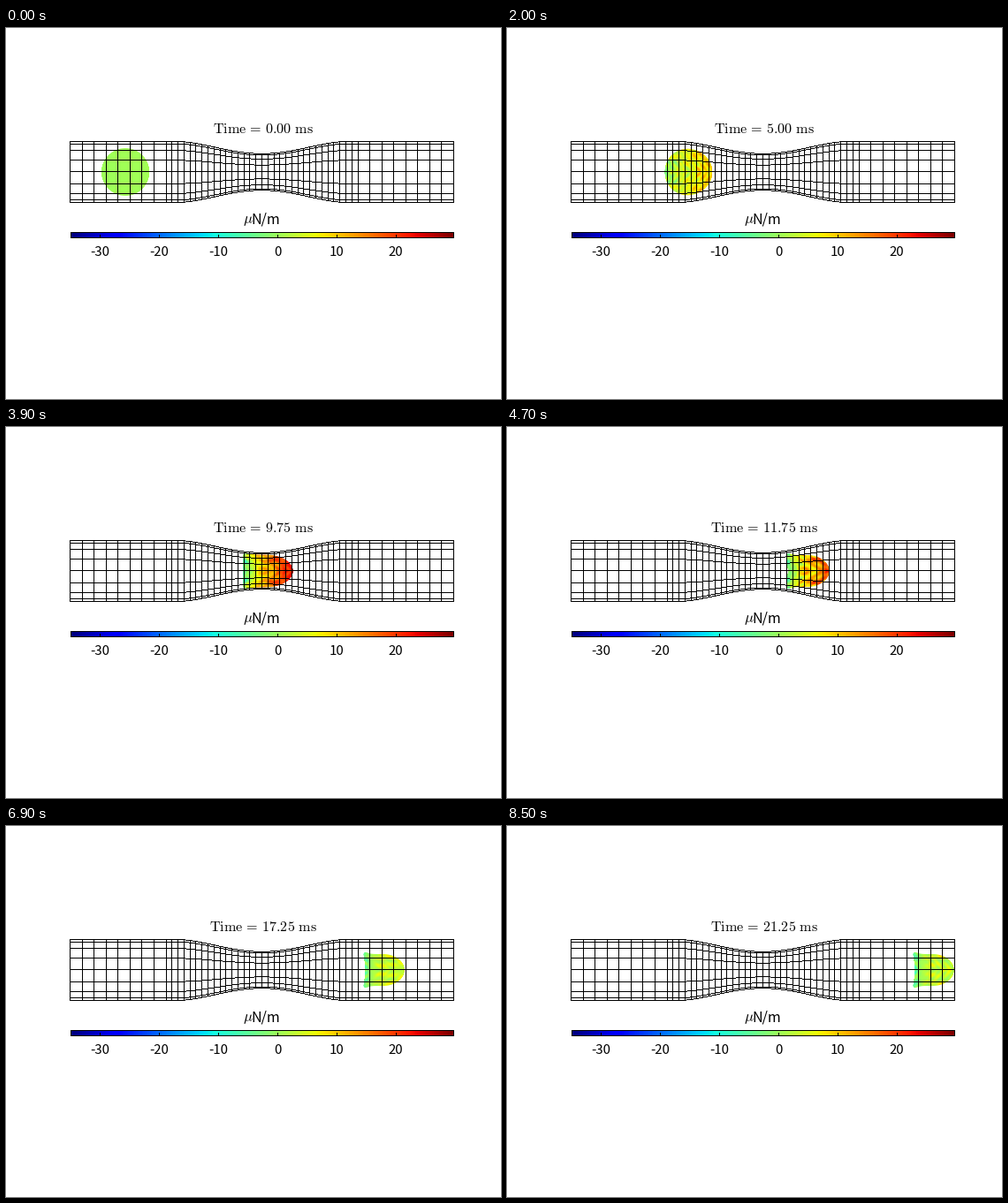
Animation of 560x420 px, one loop 8.6 s. Source, as a matplotlib script:

```python
import numpy as np
import matplotlib.pyplot as plt
from matplotlib.animation import FuncAnimation

W, H, DPI = 560, 420, 100
FRAMES, STEP = 86, 100
LEFT, RIGHT, XC, YC = 72, 506, 289, 162.5
HALF, THROAT, REACH = 34.5, 20.7, 95
VMIN, VMAX = -35, 29.7
SANS = "Noto Sans CJK JP"

plt.rcParams["mathtext.fontset"] = "cm"
jet = plt.get_cmap("jet")

fig = plt.figure(figsize=(W / DPI, H / DPI), dpi=DPI, facecolor="white")
ax = fig.add_axes([0, 0, 1, 1])
ax.axis("off")


def wall(x):
    """Half height of the channel at column x."""
    s = np.clip(np.abs(x - XC) / REACH, 0, 1)
    return HALF - (HALF - THROAT) * np.clip(np.cos(s * np.pi / 2), 0, 1) ** 1.7


def step(n, mid, width):
    return 1 / (1 + np.exp(-(n - mid) / width))


def bump(n, mid, width):
    return np.exp(-((n - mid) / width) ** 2)


def show(rgba, z):
    return ax.imshow(rgba, extent=(0, W, H, 0), aspect="auto",
                     interpolation="nearest", zorder=z)


def label(x, y, s, size, ha="center", **kw):
    return ax.text(x, y, s, fontsize=size * 72 / DPI, ha=ha, va="baseline", **kw)


def backdrop():
    """Channel mesh and colour bar, one pixel per line."""
    img = np.zeros((H, W, 4))
    black = (0, 0, 0, 1)
    cols = np.arange(LEFT, RIGHT + 1)
    for k in range(-4, 5):
        rows = np.rint(YC + np.sin(k * np.pi / 8) * wall(cols)).astype(int)
        img[rows, cols] = black
    # columns are twice as dense around the throat
    for k in range(65):
        if k % 2 == 0 or 16 <= k <= 48:
            x = int(LEFT + 0.5 + k * (RIGHT - LEFT) / 64)
            top, bottom = np.rint([YC - wall(x), YC + wall(x)]).astype(int)
            img[top:bottom + 1, x] = black

    img[231:238, 73:507] = black
    img[232:237, 74:506] = jet(np.linspace(0, 1, 432))
    for v in range(-30, 30, 10):
        img[234:237, int(307.5 + 6.69 * v)] = black
    return img


show(backdrop(), 3)
for v in range(-30, 30, 10):
    label(307.2 + 6.69 * v, 258, str(v).replace("-", "\u002d"), 15, family=SANS)
label(267.5, 221, r"$\mu$", 16.5, "left")
label(277.8, 221, "N/m", 16, "left", family=SANS)
title = label(290.5, 119, "", 16.1)

rng = np.random.default_rng(4)
WAVES = [(rng.uniform(-0.9, 0.9), rng.uniform(0.2, 0.9),
          rng.uniform(0, 2 * np.pi), rng.uniform(-0.12, 0.12))
         for _ in range(14)]

GX, GY = np.meshgrid(np.arange(W), np.arange(H))
GR = np.abs(GY - YC)
ROOM = wall(GX) - 0.5


def grain(x, n):
    total = sum(np.sin(a * x + b * GR + c + d * n) for a, b, c, d in WAVES)
    return total / np.sqrt(len(WAVES) / 2)


def cell(n):
    # steady drift plus a rush through the throat
    rush = step(n, 39.4, 6)
    squeeze = step(n, 33, 2.5)
    load = bump(n, 36, 18)
    centre = 134.5 + 3.41 * n + 57 * rush
    reach = 27.2 - 3.2 * rush + 5 * bump(n, 35, 7)
    half = 27 - 9 * squeeze

    # outline: disc, then egg, then a bullet with a flared, hollow rear
    r = GR / half
    u = (GX - centre + reach) / (2 * reach)
    hollow = 0.08 * rush * np.clip(1 - r ** 2, 0, 1) * np.clip(1 - 2 * u, 0, 1)
    s = 2 * (u - hollow) - 1
    power = np.where(s < 0, 2 + 18 * squeeze, 2)
    h = half * np.sqrt(np.clip(1 - np.abs(s) ** power, 0, 1))
    h *= 1 - 0.28 * bump(n, 29, 7) * u
    h *= 1 + 0.18 * squeeze * bump(u, 0, 0.15)
    h = np.minimum(h, ROOM)

    # surface tension: rises towards the tip and the walls, falls at the rear
    g = grain(GX - centre, n)
    v = load * (22 * np.clip(u, 0, 1) ** 1.2 + 6 * np.clip(r, 0, 1) ** 2 * (u > 0.1))
    v += 3 * rush
    v += (2 * min(n / 12, 1) + 4 * bump(n, 54, 7)) * g
    v -= 10 * squeeze * bump(u, 0.05, 0.2) * (0.6 + 0.5 * g)

    rgba = jet(np.clip((v - VMIN) / (VMAX - VMIN), 0, 1))
    rgba[..., 3] = np.where(h > 0, np.clip(h - GR + 0.5, 0, 1), 0)
    return rgba


body = show(cell(0), 2)
ax.set_xlim(0, W)
ax.set_ylim(H, 0)


def draw(n):
    body.set_data(cell(n))
    title.set_text(r"$\mathrm{Time}\,=\,\mathrm{%.2f}\ \mathrm{ms}$" % (n / 4))
    return body, title


anim = FuncAnimation(fig, draw, frames=FRAMES, interval=STEP,
                     repeat=True, repeat_delay=0)
plt.show()
```
